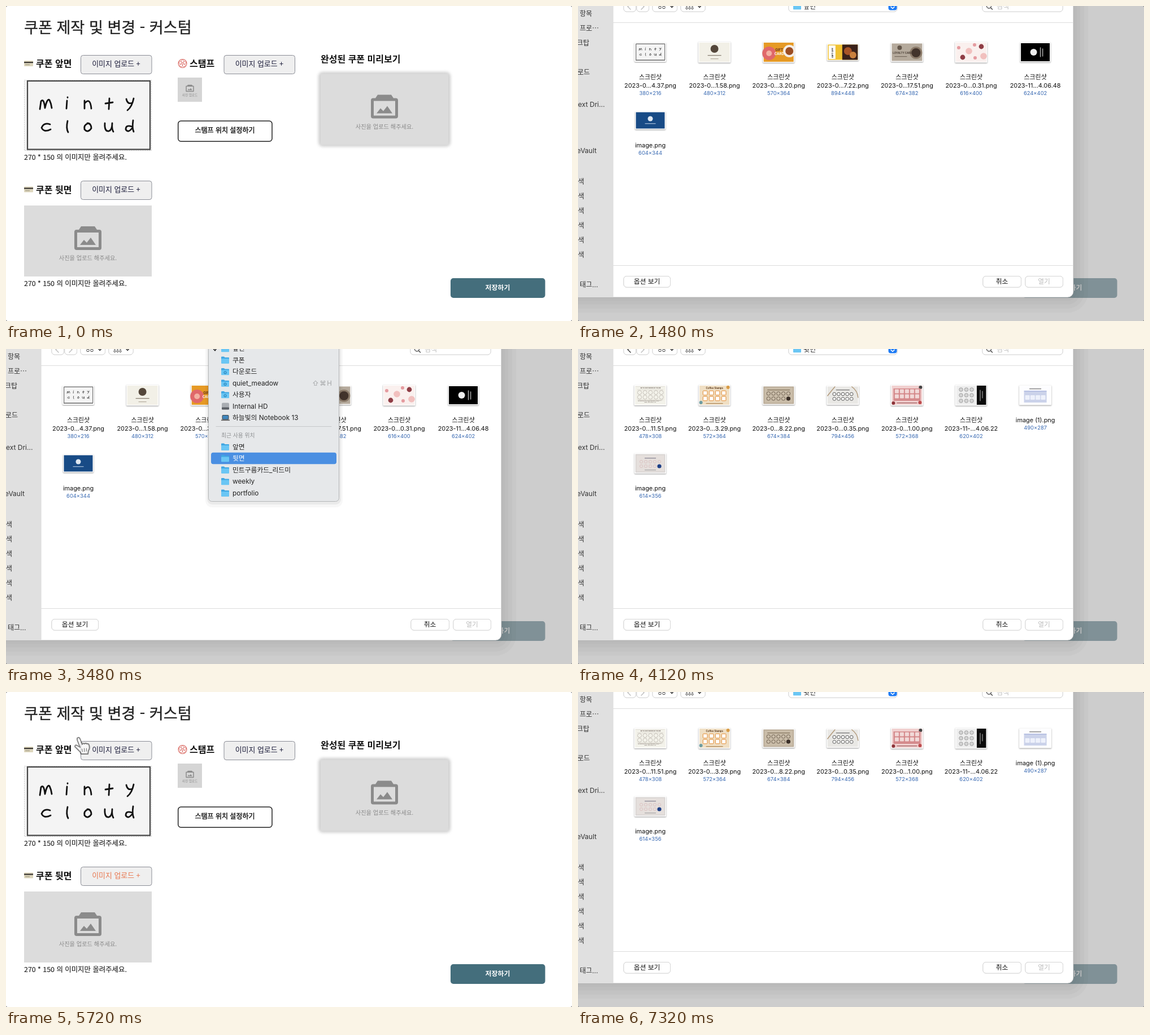
Animation of 1002 by 559 pixels, one loop 8 s. Source, as an HTML page:

```html
<!DOCTYPE html>
<html lang="ko">
<head>
<meta charset="utf-8">
<title>쿠폰 제작</title>
<style>
html, body { margin: 0; width: 100%; height: 100%; overflow: hidden; background: #666; }
svg { display: block; width: 1002px; height: 559px; }
text { white-space: pre; }
.web { font-family: 'Noto Sans CJK KR', 'Noto Sans CJK JP', 'Noto Sans', sans-serif; }
.mac { font-family: Inter, 'Noto Sans CJK KR', 'Noto Sans CJK JP', 'DejaVu Sans', sans-serif; }
</style>
</head>
<body>
<svg id="stage" viewBox="0 0 1002 559"></svg>
<script>
const LOOP = 8000, STEP = 40;

// ---- drawing helpers ----
const rect = (x, y, w, h, fill, r = 0, more = '') =>
  `<rect x="${x}" y="${y}" width="${w}" height="${h}" rx="${r}" fill="${fill}" ${more}/>`;
const circle = (x, y, r, fill, more = '') => `<circle cx="${x}" cy="${y}" r="${r}" fill="${fill}" ${more}/>`;
const path = (d, stroke, w = 1, more = '') =>
  `<path d="${d}" fill="none" stroke="${stroke}" stroke-width="${w}" stroke-linecap="round" stroke-linejoin="round" ${more}/>`;
const text = (s, x, y, size, fill = '#111', more = '') =>
  `<text x="${x}" y="${y}" font-size="${size}" fill="${fill}" ${more}>${s}</text>`;
const mid = (s, x, y, size, fill, more = '') => text(s, x, y, size, fill, 'text-anchor="middle" ' + more);
const group = (body, x = 0, y = 0, k = 1, more = '') =>
  `<g transform="translate(${x} ${y}) scale(${k})" ${more}>${body}</g>`;
const grid = (cols, rows, x, y, dx, dy, cell) => {
  let out = '';
  for (let j = 0; j < rows; j++) for (let i = 0; i < cols; i++) out += cell(x + i * dx, y + j * dy);
  return out;
};
const BOLD = 'font-weight="700"';
const medium = (w = .25) => `stroke="#222" stroke-width="${w}"`;

// ---- coupon artwork ----
const letters = [
  'M-11 10L-9-4Q-4-10-2 8Q2-10 6-6Q9 0 10 8', 'M0-5L-1 9M1-11v.5', 'M-6 9L-6-5M-6 0Q4-12 6 9',
  'M1-9L0 10M-6 0L7-2', 'M-6-8Q-4 2 4-1M7-9Q4 6-4 12', 'M7-5Q-4-9-8 1Q-4 10 8 4', 'M1-11Q-2 2 2 9',
  'M1-7Q-8-4-6 4Q0 11 6 2Q6-7-1-7', 'M-7-7Q-8 8 0 7Q6 5 6-7Q5 3 8 8', 'M4-1Q-7-5-7 4Q-3 11 4 2M6-12Q4 2 7 8'
];
const frontCard = rect(0, 0, 226, 126, '#f4f4f4') +
  rect(6, 2, 217, 121.5, '#f4f4f4', 0, 'stroke="#444" stroke-width="2.2"') +
  letters.map((d, i) => group(path(d, '#111', 2.8), 39 + i % 5 * 37, i < 5 ? 42 : 84)).join('');

const dots = y => path(`M15 ${y}H214`, '#a99f95', 1.8, 'stroke-dasharray="0 4"');
const backCard = rect(0, 0, 226, 126, '#f3f2ea') +
  path('M1 .5H225', '#aaa', 1, 'stroke-dasharray="1 3"') +
  mid('BUY 10 COFFEE AND WE GIFT YOU ONE', 115.5, 15, 8.1, '#5a4b44', BOLD) + dots(25.5) + dots(103.5) +
  grid(5, 2, 30.3, 46.5, 42, 36, (x, y) => circle(x, y, 15.6, 'none', 'stroke="#7d726a" stroke-width="1.6"')) +
  text('Lorem ipsum dolor sit amet, consectetuer adipiscing elit, sed diem nonummy', 18, 111.5, 5.05, '#6b5f58') +
  text('nibh euismod tincidunt ut laoreet dolore magna aliquam erat volutpat.', 18, 117, 5.05, '#6b5f58') +
  mid('www.coffeename.com', 112, 126, 7.8, '#5a4b44', 'font-weight="600" letter-spacing=".3"');

const photoIcon = `<path fill="#8b8b8b" fill-rule="evenodd" d="M-12-21H12L16-15H20Q24-15 24-11V17Q24 21 20 21H-20Q-24 21-24 17V-11Q-24-15-20-15H-16Z
  M-19-10V16H19V-10ZM-14 12L-7 3L-2 8L5-1L14 12Z"/>`;
const blank = rect(0, 0, 226, 126, '#dcdcdc') + group(photoIcon, 113, 58) +
  mid('사진을 업로드 해주세요.', 113, 97, 10.2, '#8a8a8a');

// ---- web page ----
const cardIcon = y => rect(32, y, 16, 10, '#ddd6bd', 1) + rect(32, y + 2, 16, 2.2, '#3a3733') +
  rect(34, y + 6.5, 8, 1.3, '#a59e88');
const stampIcon = circle(312.5, 102, 7.5, '#fff', 'stroke="#d8635c" stroke-width="1.1"') +
  [0, 72, 144, 216, 288].map(a => circle(312.5, 98.2, 2.6, 'none',
    `stroke="#d8635c" stroke-width=".7" transform="rotate(${a} 312.5 102)"`)).join('');
const upload = (x, y, id) => rect(x + .5, y + .5, 125.5, 33, '#efefef', 4, 'stroke="#8b8d96"') +
  mid('이미지 업로드 +', x + 63, y + 20.3, 12.9, '#1b1c3a', `id="${id}"`);
const hint = y => text('270 * 150 의 이미지만 올려주세요.', 32, y, 12.4, '#222', medium(.15));
const heading = (s, x, y) => text(s, x, y, 16, '#111', BOLD);

const page = rect(0, 0, 1002, 559, '#fff', 3) +
  text('쿠폰 제작 및 변경 - 커스텀', 32, 47.5, 27.1, '#222', medium(.35)) +
  cardIcon(97) + heading('쿠폰 앞면', 53, 108) + upload(132, 87, 'upFront') +
  group(frontCard + rect(.5, .5, 225, 125, 'none', 0, 'stroke="#ccc" stroke-dasharray="2 2"'), 32, 131) + hint(273) +
  cardIcon(320.5) + heading('쿠폰 뒷면', 53, 331.5) + upload(132, 310, 'upBack') + hint(496.5) +
  stampIcon + heading('스탬프', 325, 108) + upload(385.5, 87, 'upStamp') +
  rect(304, 127, 43, 43, '#d5d5d5') + group(photoIcon, 325.5, 146, .3) + mid('사진 업로드', 325.5, 159.5, 5.6, '#8a8a8a') +
  rect(304.7, 204, 166.3, 36.3, '#fff', 5, 'stroke="#222" stroke-width="1.5"') +
  mid('스탬프 위치 설정하기', 387.5, 225.3, 12, '#111', medium(.45)) +
  heading('완성된 쿠폰 미리보기', 557, 100) +
  rect(553, 117, 234, 132.5, '#d0d0d0', 8, 'style="filter:blur(2.5px)"') +
  [[32, 354], [557, 120.5]].map(([x, y]) => group(blank, x, y, 1, 'class="blank"') +
    group(backCard, x, y, 1, 'class="filled mac" clip-path="url(#cardClip)"')).join('') +
  rect(787, 483, 167.5, 35, '#446e7c', 5) + mid('저장하기', 870.5, 504, 11.9, '#fff', BOLD);

// ---- file thumbnails: [width, height, art] in a 54 wide box centred on 0,0 ----
const bars = (y, w, fill) => rect(-w / 2, y, w, 1.3, fill);
const ring = (r, stroke) => (x, y) => circle(x, y, r, 'none', `stroke="${stroke}" stroke-width=".8"`);
const tile = (s, fill, stroke = 'none') => (x, y) => rect(x - s / 2, y - s / 2, s, s, fill, 1, `stroke="${stroke}"`);
const fronts = [
  [53, 31, group(frontCard, -26.5, -15.5, .235) + rect(-25.5, -14.5, 51, 29, 'none', 0, 'stroke="#777"')],
  [54, 34, rect(-27, -17, 54, 34, '#f2f0e7') + circle(0, -6, 7, '#54473b') + bars(5, 24, '#8a8174') + bars(11, 14, '#b5ad9f')],
  [53, 34, rect(-26.5, -17, 53, 34, '#e69a25') + circle(-17, 2, 12, '#e0686a') + circle(-17, 2, 5, '#f2b1a2') +
    circle(19, -2, 11, '#f4eee6') + circle(19, -2, 7, '#9b4d22') + mid('GIFT', 1, -2, 6, '#67341a', BOLD) + mid('CARD', 1, 5, 6, '#fff', BOLD)],
  [53, 27, rect(-26.5, -13.5, 53, 27, '#f1c232') + rect(-25, -12, 12, 24, '#fff') + rect(-1, -13.5, 27.5, 27, '#3a211a') +
    circle(9, -2, 7, '#a85427') + circle(18, 5, 6, '#c9803d') + text('GIFT OFF', 0, 0, 4, '#222', BOLD + ' transform="translate(-17 10) rotate(-90)"')],
  [54, 31, rect(-27, -15.5, 54, 31, '#b5aa9c') + circle(16, 1, 11, '#8c7b6a') + circle(16, 1, 8, '#42332b') +
    circle(-13, -8, 4, '#63564a') + mid('LOYALTY CARD', -8, 3, 4.5, '#4c4037', BOLD) + rect(-22, 7, 22, 1.2, '#75695d')],
  [54, 34, rect(-27, -17, 54, 34, '#faf0ee') + [[-22, -8], [-15, 9], [-4, -2], [7, 10], [18, -10], [22, 7], [6, -13]]
    .map(([x, y], i) => circle(x, y, 3 + i % 3 * 1.4, ['#e59ba0', '#8f3d45', '#f1c0be'][i % 3])).join('')],
  [51, 32, rect(-25.5, -16, 51, 32, '#000') + circle(-3, 0, 6, '#eee') + path('M9-8V8M13-6V7', '#aaa', 1.5)],
  [51, 29, rect(-25.5, -14.5, 51, 29, '#184b86') + circle(0, -3, 4.5, '#dfe8f2') + bars(5, 19, '#9db7d4')]
];
const backs = [
  [54, 33, rect(-27, -16.5, 54, 33, '#f3f2ea') + group(backCard, -26, -15.5, .23)],
  [53, 34, rect(-26.5, -17, 53, 34, '#f0dfc4') + circle(-24, 13, 3, '#6e9da3') + circle(24, -14, 3, '#d89b45') +
    mid('Coffee Stamps', 0, -11.5, 4.2, '#5c3a1c', BOLD) + grid(4, 2, -16.5, -4, 11, 10, tile(7.6, '#fff', '#e38a2e')) + bars(14, 30, '#b08a5a')],
  [54, 31, rect(-27, -15.5, 54, 31, '#b9ab97') + rect(-25, -13.5, 50, 27, '#cabda9') + bars(-10, 40, '#84755f') +
    grid(5, 2, -18, -3, 8.8, 9, ring(3.2, '#5e5040')) + circle(17.2, 6, 3.6, '#3b3029')],
  [54, 31, rect(-27, -15.5, 54, 31, '#e9e8e5') + path('M-27 1Q-20-8-14-15M16-15Q26-8 27 4', '#b29a7c', 1.5) + bars(-10, 24, '#777') +
    grid(5, 2, -15, -2, 7.6, 8.5, (x, y) => circle(x, y, 2.8, '#fff', 'stroke="#555"'))],
  [54, 34, rect(-27, -17, 54, 34, '#f0d0cf') + circle(-24, 14, 3, '#8d3439') + circle(24, -14, 3, '#444') + circle(23, 13, 3, '#bd4b4d') +
    rect(-24, -12, 48, 22, '#d58b8d') + grid(5, 2, -18, -7, 9, 9, tile(7, '#f1d9d8')) + bars(13, 36, '#a35b5e')],
  [53, 34, rect(-26.5, -17, 53, 34, '#eee') + rect(10, -17, 16.5, 34, '#0c0c0c') +
    grid(3, 3, -18, -10, 9.5, 10, (x, y) => circle(x, y, 3.3, '#d4d4d4', 'stroke="#888" stroke-width=".7"')) + path('M16-9V10M20-7V5', '#bbb', 1)],
  [54, 32, rect(-27, -16, 54, 32, '#fdfdff') + bars(-12, 21, '#777') + rect(-20, -7, 40, 20, '#cbd2ea') +
    grid(4, 1, -14, 4, 9.3, 9, tile(8, '#eef1fb')) + bars(-8, 40, '#a9b4dd')],
  [53, 33, rect(-26.5, -16.5, 53, 33, '#d9d5d4') + rect(-24.5, -14.5, 49, 29, '#e5dfdc') + bars(-10, 20, '#8a8795') +
    grid(5, 2, -16, -3, 8, 8, ring(2.6, '#d9bdbb')) + circle(16, 5, 3.6, '#1d3f86') + bars(11, 20, '#aaa')]
];
const frontInfo = [['2023-0...4.37.png', '380×216'], ['2023-0...1.58.png', '480×312'], ['2023-0...3.20.png', '570×364'],
  ['2023-0...7.22.png', '894×448'], ['2023-0...17.51.png', '674×382'], ['2023-0...0.31.png', '616×400'],
  ['2023-11...4.06.48', '624×402'], ['image.png', '604×344']];
const backInfo = [['2023-0...11.51.png', '478×308'], ['2023-0...3.29.png', '572×364'], ['2023-0...8.22.png', '674×384'],
  ['2023-0...0.35.png', '794×456'], ['2023-0...1.00.png', '572×368'], ['2023-11-...4.06.22', '620×402'],
  ['image (1).png', '490×287'], ['image.png', '614×356']];

const files = (art, info) => art.map(([w, h, body], i) => {
  const [name, size] = info[i], short = name.startsWith('image'), y = short ? 143 : 158;
  const frame = rect(-w / 2 - 1.5, -h / 2 - 1.5, w + 3, h + 3, '#fff', 1, 'style="filter:drop-shadow(0 1px 1px #999)"');
  return group(group(frame + body, 0, 82) + (short ? '' : mid('스크린샷', 0, 129.5, 10.9)) +
    mid(name, 0, short ? 130 : 144.5, 10.9) + mid(size, 0, y - .5, 9.4, '#3869b2'),
    128 + i % 7 * 113.6, i > 6 ? 121 : 0);
}).join('');

const picked = rect(96, 53, 65, 48, '#d4d4d4', 4) +
  group(rect(-28.5, -18, 57, 36, '#fff', 1) + backs[0][2], 128, 82) +
  rect(105, 117, 46, 15, '#3f7fd6', 3) + rect(77, 132, 102, 16, '#3f7fd6', 3) +
  mid('스크린샷', 128, 129.5, 10.9, '#fff') + mid('2023-0...11.51.png', 128, 144.5, 10.9, '#fff');

// ---- open panel ----
const folder = (x, y) => `<path fill="#3fa6e2" d="M${x} ${y + 1}q0-1 1-1h4l1.5 1.5H${x + 13}q1 0 1 1V${y + 11}q0 1-1 1H${x + 1}q-1 0-1-1Z"/>` +
  rect(x, y + 3.5, 14, 8.8, '#6ac6f4', 1);
const field = (x, y, w, h) => rect(x, y, w, h, '#fff', 5, 'stroke="#d5d5d5" stroke-width=".8" style="filter:drop-shadow(0 .6px .5px #bbb)"');
const side = [['항목', 3, 18], ['프로⋯', 3, 44], ['크탑', -2, 70], ['로드', -1, 122], ['ext Dri...', 0, 178.5], ['eVault', -2, 260.5], ['태그...', 3, 499],
  ...[0, 1, 2, 3, 4, 5].map(i => ['색', 0, 316 + 26 * i])];
const shadow = [26, 19, 12, 6].map(d => rect(-60, -60, 937 + d, 577 + d * 1.05, '#000', 10 + d, 'opacity=".022"')).join('');

const panel = shadow + rect(-20, -60, 897, 577, '#fff', 10, 'stroke="#aaa" stroke-width=".7"') +
  rect(-20, -60, 82, 577, '#e0e0e0') + path('M62-40V516M62.5 29.5H876M62.5 460.5H876', '#dcdcdc') +
  side.map(([s, x, y]) => text(s, x, y, 12, '#333')).join('') +
  field(81, -12, 21.5, 22) + field(104, -12, 21.5, 22) + field(132, -12, 43.5, 22) + field(182, -12, 43, 22) +
  path('M93-4L88 1L93 6', '#bbb', 1.4, 'id="goBack"') + path('M112-4L117 1L112 6', '#bbb', 1.4) +
  grid(2, 2, 145, -4.5, 7, 7, tile(4, 'none', '#444')) + grid(3, 2, 192.5, -1, 5, 5, tile(3, 'none', '#444')) +
  path('M164 0l2.2 2.4l2.2-2.4M213 0l2.2 2.4l2.2-2.4', '#333', 1.5) +
  field(373, -12, 192, 22) + folder(381, -6) + text('앞면', 399, 4.5, 12, '#222', 'id="where"') +
  rect(549.5, -8, 15, 15.5, '#1f7cf5', 4) + path('M554 1.5l3 3l3-3', '#fff', 1.6) +
  field(716, -12, 142, 22) + circle(727.5, 0, 4, 'none', 'stroke="#444" stroke-width="1.3"') + path('M730.5 3l3 3', '#444', 1.4) +
  text('검색', 741, 4.5, 12, '#bbb') +
  `<g id="fronts">${files(fronts, frontInfo)}</g><g id="backs">${files(backs, backInfo)}<g id="picked">${picked}</g></g>` +
  field(81, 479.5, 82.5, 19.5) + mid('옵션 보기', 122, 492.5, 11.8) +
  field(717, 479.5, 67.5, 19.5) + mid('취소', 750.5, 492.5, 11.8) +
  field(792, 479.5, 66.5, 19.5) + mid('열기', 825, 492.5, 11.8, '#bbb', 'id="open"');

// ---- folder menu ----
const rows = ['앞면', '쿠폰', '다운로드', 'quiet_meadow', '사용자', 'Internal HD', '하늘빛의 Notebook 13', '앞면', '뒷면', '민트구름카드_리드미', 'weekly', 'portfolio'];
const rowY = i => (i < 7 ? -1 : 30) + i * 20.5;
const rowIcon = i => {
  const y = rowY(i);
  if (i === 5) return rect(382, y - 6, 13, 12, '#a9adb2', 2) + rect(382, y + 2, 13, 4, '#5c6066', 1);
  if (i === 6) return rect(383, y - 4.5, 11, 7.5, '#3f86bd', 1, 'stroke="#444"') + rect(381, y + 3.5, 15, 1.6, '#555');
  return folder(381, y - 6) + (i > 1 && i < 5 ? circle(388, y + 1.8, 2, 'none', 'stroke="#2a86bd" stroke-width="1.2"') : '');
};
const menu = rect(353, -20, 243, 301, '#000', 12, 'opacity=".03"') + rect(356, -20, 237, 296, '#000', 9, 'opacity=".05"') +
  rect(358.5, -20, 231, 290.5, '#e6e8ea', 6, 'stroke="#b4b6b8"') +
  rect(363, 0, 222, 20.5, '#4a8fe2', 4, 'id="glow"') + path('M367.5 0l2.5 3l4-6', '#222', 1.5) +
  path('M372 137.5H576', '#c6c8ca') + text('최근 사용 위치', 381, 157, 9.8, '#8d8f91') +
  text('⇧⌘H', 542, 65, 11.5, '#a2a4a6', 'letter-spacing="1.5"') +
  rows.map((s, i) => rowIcon(i) + text(s, 401, rowY(i) + 4.3, 11.8, '#222', 'class="row"')).join('');

const hand = `<path fill="#fff" stroke="#111" stroke-width="2" stroke-linejoin="round" d="M126 82q3-3 5 1l4 10q1-3 4-1q2-2 4 0q3-1 4 2q2 6-1 10l-1 6h-12l-2-4l-9-9q0-4 4-2l5 3l-5-13Z"/>` +
  path('M134.5 101l1 5M138.5 100l.5 6M142.5 100v5', '#111', 1.2);

const stage = document.getElementById('stage');
stage.innerHTML = `<defs><clipPath id="cardClip"><rect width="226" height="126"/></clipPath></defs>
  <g class="web">${page}</g>` + rect(0, 0, 1002, 559, '#aaa', 3, 'id="dim"') +
  `<g class="mac"><g id="panel">${panel}</g><g id="menu">${menu}</g></g><g id="hand">${hand}</g>`;

// ---- timeline ----
const el = id => document.getElementById(id);
const all = sel => [...stage.querySelectorAll(sel)];
const blanks = all('.blank'), filled = all('.filled'), rowTexts = all('.row');
const ramp = (t, a, b) => Math.min(1, Math.max(0, (t - a) / (b - a)));
const show = (node, a) => { node.style.display = a > 0 ? '' : 'none'; node.style.opacity = a; };
const tint = (id, on, hot, cold) => el(id).setAttribute('fill', on ? hot : cold);
const hover = [[0, -1], [2440, 0], [2680, 1], [2720, 2], [2920, 4], [2960, 5], [3000, 6], [3080, -1], [3120, 7], [3160, 8],
  [3240, 9], [3280, 10], [3400, 9], [3480, 8], [3760, -1], [3840, 8]];

function draw(t) {
  const again = ramp(t, 7160, 7320);
  const shown = ramp(t, 1280, 1480) - ramp(t, 5400, 5600) + again;
  show(el('panel'), shown);
  el('panel').setAttribute('transform', `translate(0 ${-22 * (1 - shown)})`);
  show(el('dim'), .59 * (ramp(t, 1280, 1480) - ramp(t, 5400, 5560) + again));

  const inBack = t >= 4080, select = t >= 5080 && t < 7000;
  show(el('fronts'), +!inBack);
  show(el('backs'), +inBack);
  show(el('picked'), +select);
  el('where').textContent = inBack ? '뒷면' : '앞면';
  tint('open', select, '#222', '#bbb');
  el('goBack').setAttribute('stroke', inBack && t < 7000 ? '#333' : '#bbb');

  show(el('menu'), ramp(t, 2400, 2480) - ramp(t, 3880, 4040));
  const row = hover.filter(h => h[0] <= t).pop()[1];
  show(el('glow'), +(row >= 0));
  el('glow').setAttribute('y', rowY(row) - 10.2);
  rowTexts.forEach((n, i) => n.setAttribute('fill', i === row ? '#fff' : '#222'));

  tint('upBack', t >= 760 && t < 6000, '#e8774f', '#1b1c3a');
  tint('upStamp', t >= 6640, '#e0593f', '#1b1c3a');
  blanks.forEach(n => show(n, +(t < 6000)));
  filled.forEach(n => show(n, +(t >= 6000)));
  show(el('hand'), t >= 5080 ? 1 - ramp(t, 5560, 5880) : 0);
}

const start = performance.now();
function tick() {
  const t = (performance.now() - start) % LOOP;
  draw(Math.floor(t / STEP) * STEP);
  requestAnimationFrame(tick);
}
tick();
</script>
</body>
</html>
```
